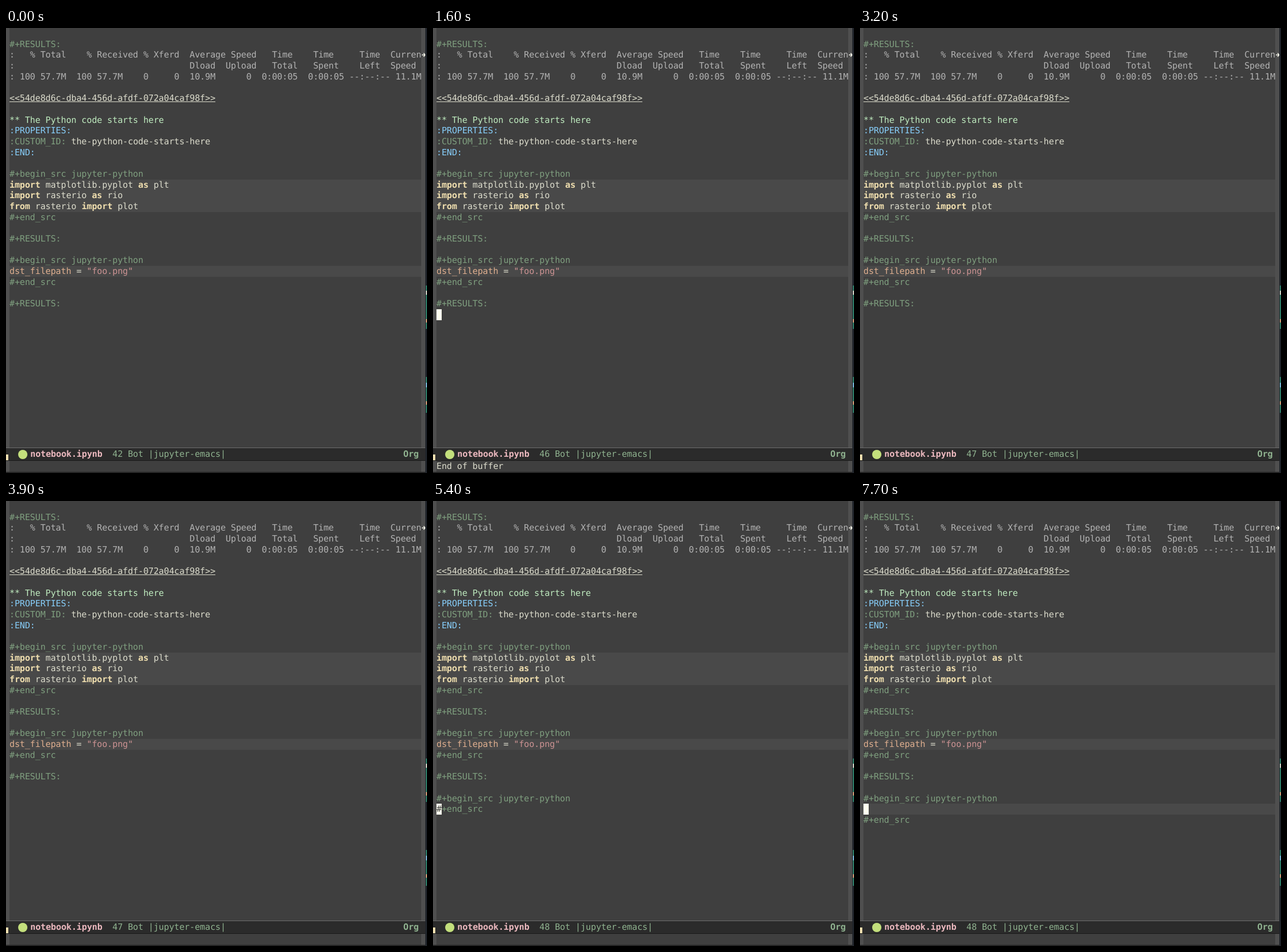
An HTML page that plays this animation: 728x769 px, repeating every 8 s.

```html
<!DOCTYPE html>
<html lang="en">
<head>
<meta charset="utf-8">
<title>Notebook editing</title>
<style>
:root { --row: 18.69px; --bg: #3f3f3f; --fg: #dcdccc; --green: #7f9f7f; --mode: #8fb28f; --yellow: #f0dfaf; }
html, body { margin: 0; width: 100%; height: 100%; overflow: hidden; background: var(--bg); }
#stage {
  position: relative; width: 728px; height: 769px; overflow: hidden;
  background: linear-gradient(90deg, #4f4f4f 6px, var(--bg) 6px 718px, #4f4f4f 718px);
  color: var(--fg);
  font: 15px/var(--row) "DejaVu Sans Mono", monospace;
  letter-spacing: -.13px; text-rendering: geometricPrecision;
}
#stage div, #stage svg { position: absolute; }
.scene { inset: 0; }
.text { left: 6px; white-space: pre; }
.hl { left: 6px; width: 712px; height: var(--row); background: #494949; }
b { color: var(--yellow); }
i { font-style: normal; color: var(--green); }
.out { color: #b3b3b3; }
.target { text-decoration: underline; }
.head { color: #bfebbf; }
.drawer { color: #87cefa; }
.var { color: #dfaf8f; }
.str { color: #cc9393; }

/* mode lines */
.bar {
  left: 0; width: 725px; box-sizing: border-box; overflow: hidden; white-space: pre;
  background: #2b2b2b; color: var(--mode);
  border: solid; border-width: 1px 0; border-color: #6c6c6c transparent #1a1a1a;
}
.bar div { top: 1px; }
.bar b { color: inherit; }
.bar .file { color: #ecb9bf; font-weight: bold; }
.bar .icon { width: 16px; height: 16px; border-radius: 50%; background: #c3df7c; }
.bar .tab { left: 0; width: 4px; background: var(--yellow); }
.dim { background: #383838; color: #5f7f5f; }
.dim .file { color: inherit; }
.dim .icon { background: #5f7f5f; }

/* timeline */
.main, .menu, .echo, .tail, .end, .fresh, #cursor, #cursor::before, #line::before {
  animation: 8s step-end infinite;
}
.main { animation-name: main; }
.menu { animation-name: menu; }
.echo { animation-name: echo; }
.tail { animation-name: tail; }
.end { animation-name: end; }
.fresh { animation-name: fresh; }
#cursor { left: 6px; width: 8.9px; height: var(--row); background: #fffff0; color: #3f3f3f; white-space: pre; animation-name: move, blink; }
#cursor::before { content: ""; animation-name: glyph; }
#line::before { content: "42"; animation-name: line; }

@keyframes main { 0%, 67.5%, 100% { opacity: 1 } 52.5% { opacity: 0 } }
@keyframes menu { 0%, 67.5%, 100% { opacity: 0 } 52.5% { opacity: 1 } }
@keyframes echo { 0%, 28.75%, 100% { opacity: 0 } 20% { opacity: 1 } }
@keyframes tail { 0% { opacity: 0 } 67.5%, 100% { opacity: 1 } }
@keyframes fresh { 0% { opacity: 0 } 78.75%, 100% { opacity: 1 } }
@keyframes end { 0% { top: calc(28 * var(--row)) } 78.75%, 100% { top: calc(29 * var(--row)) } }
@keyframes blink {
  0%, 26.25%, 40%, 48.75%, 71.25%, 90% { opacity: 0 }
  6.25%, 28.75%, 42.5%, 67.5%, 77.5%, 96.25%, 100% { opacity: 1 }
}
@keyframes move {
  0% { top: calc(22 * var(--row)) }
  8.75% { top: calc(23 * var(--row)) }
  11.25% { top: calc(24 * var(--row)) }
  15% { top: calc(25 * var(--row)) }
  17.5% { top: calc(26 * var(--row)) }
  28.75% { top: calc(27 * var(--row)) }
  67.5% { top: calc(28 * var(--row)) }
  78.75% { top: calc(29 * var(--row)) }
  82.5%, 100% { top: calc(28 * var(--row)) }
}
@keyframes glyph {
  0% { content: "d" }
  8.75%, 15%, 67.5% { content: "#" }
  11.25%, 17.5%, 82.5%, 100% { content: "" }
}
@keyframes line {
  0% { content: "42" }
  8.75% { content: "43" }
  11.25% { content: "44" }
  15% { content: "45" }
  17.5% { content: "46" }
  28.75% { content: "47" }
  67.5% { content: "48" }
  78.75% { content: "49" }
  82.5%, 100% { content: "48" }
}
</style>
</head>
<body>
<div id="stage">
  <div class="scene main">
    <div class="hl" style="top:261.7px;height:56.1px"></div>
    <div class="hl" style="top:411.2px"></div>
    <div class="hl fresh" style="top:523.3px"></div>
    <div class="text" style="top:var(--row)"><i>#+RESULTS:</i>
<span class="out">:   % Total    % Received % Xferd  Average Speed   Time    Time     Time  Curren
:                                  Dload  Upload   Total   Spent    Left  Speed
: 100 57.7M  100 57.7M    0     0  10.9M      0  0:00:05  0:00:05 --:--:-- 11.1M</span>

<span class="target">&lt;&lt;54de8d6c-dba4-456d-afdf-072a04caf98f&gt;&gt;</span>

<span class="head">** The Python code starts here</span>
<span class="drawer">:PROPERTIES:</span>
<i>:CUSTOM_ID:</i> the-python-code-starts-here
<span class="drawer">:END:</span>

<i>#+begin_src jupyter-python</i>
<b>import</b> matplotlib.pyplot <b>as</b> plt
<b>import</b> rasterio <b>as</b> rio
<b>from</b> rasterio <b>import</b> plot
<i>#+end_src

#+RESULTS:

#+begin_src jupyter-python</i>
<span class="var">dst_filepath</span> = <span class="str">"foo.png"</span>
<i>#+end_src

#+RESULTS:</i></div>
    <div class="text tail" style="top:504.6px"><i>#+begin_src jupyter-python</i></div>
    <div class="text tail end" style="animation-name:tail,end"><i>#+end_src</i></div>
    <div id="cursor"></div>
    <svg style="left:718px;top:41px" width="8" height="11" fill="none" stroke="#f4f4e8" stroke-width="1.6"><path d="M1 5.5H7M4 2.5L7 5.5L4 8.5"/></svg>
    <div class="bar" style="top:725px;height:23px">
      <div class="tab" style="top:11px;height:10px"></div>
      <div class="icon" style="left:21px;top:3px"></div>
      <div class="file" style="left:42px">notebook.ipynb</div>
      <div style="left:184px"><span id="line"></span> Bot |jupyter-emacs|</div>
      <div style="left:687px"><b>Org</b></div>
    </div>
    <div class="text echo" style="top:748px">End of buffer</div>
  </div>

  <div class="scene menu">
    <div class="hl" style="top:0"></div>
    <div class="hl" style="top:112.1px"></div>
    <div class="text" style="top:0"><b>from</b> rasterio <b>import</b> plot
<i>#+end_src

#+RESULTS:

#+begin_src jupyter-python</i>
<span class="var">dst_filepath</span> = <span class="str">"foo.png"</span>
<i>#+end_src

#+RESULTS:</i></div>
    <div class="bar dim" style="top:426px;height:22px">
      <div class="icon" style="left:21px;top:3px"></div>
      <div class="file" style="left:42px">notebook.ipynb</div>
      <div style="left:184px">47 Bot |jupyter-emacs|</div>
      <div style="left:687px"><b>Org</b></div>
    </div>
    <div class="bar" style="top:448px;height:19px;color:var(--yellow)"><div style="left:0;top:0">Use C-n, C-p, C-v, M-v to navigate.</div></div>
    <div class="text" style="top:467.25px">Select a key
============

[p]     src jupyter-python
[a]     export ascii
[c]     center
[C]     comment
[e]     example
[E]     export
[h]     export html
[l]     export latex
[q]     quote
[s]     src
[v]     verse</div>
    <div class="bar" style="top:725px;height:23px">
      <div class="tab" style="top:0;height:18px"></div>
      <div class="icon" style="left:22px;top:2px;width:17px;height:17px;background:#8c8c8c"></div>
      <div class="file" style="left:44px;color:var(--yellow)">*Org Select*</div>
      <div style="left:168.6px">1 Top |jupyter-emacs|</div>
      <div style="left:612px"><b>Fundamental</b></div>
    </div>
    <div class="text" style="top:748px">Key:</div>
  </div>

  <!-- window frame and the sliver of its neighbour -->
  <svg width="728" height="769" style="left:0;top:0">
    <path d="M0 767H728V769H0Z" fill="#252525"/>
    <path d="M725 0H728V769H725Z" fill="#20242a"/>
    <path d="M727 445V520M727 603V665" stroke="#2f7f69" stroke-width="2"/>
    <path d="M727 454V461" stroke="#d0d0c4" stroke-width="2"/>
    <path d="M727 503V509M727 645V651" stroke="#cf9a76" stroke-width="2"/>
    <path d="M727 613V621" stroke="#78b4d8" stroke-width="2"/>
  </svg>
</div>
</body>
</html>
```
